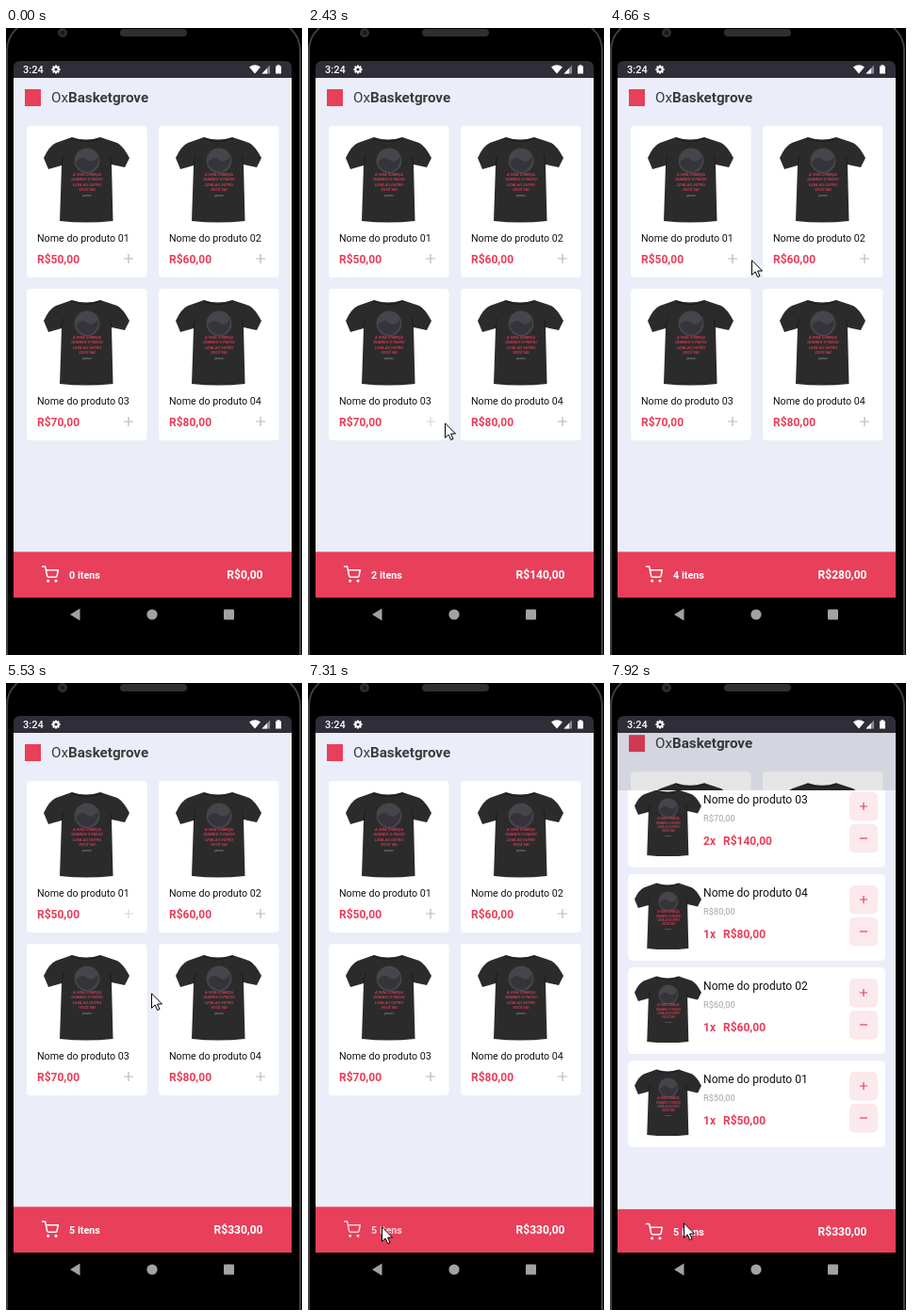
These frames come from a looping animation (314x666 px, 8000 ms). An HTML page:

```html
<!DOCTYPE html>
<html lang="pt-BR">
<head>
<meta charset="utf-8">
<title>Loja</title>
<style>
  html, body { margin: 0; width: 100%; height: 100%; overflow: hidden; background: #000; }
  svg { display: block; }
  text { font-family: Roboto, sans-serif; white-space: pre; }
  .bold { font-weight: 700; }
  .red { fill: #e83f5b; }
</style>
</head>
<body>
<svg id="stage" width="100%" height="100%" viewBox="0 0 314 666"></svg>
<script>
const LOOP = 8000, STEP = 77;
const RED = '#e83f5b', PAGE = '#ebeef8';
const SCREEN_TOP = 53, SCREEN_HEIGHT = 552, SCREEN_BOTTOM = 605;
const PRICES = [50, 60, 70, 80];
const CART_ROWS = [[2, 2], [3, 1], [1, 1], [0, 1]]; // product, quantity

// product, press time, release time
const TAPS = [[2, 1630, 1730], [2, 1960, 2270], [3, 3340, 3500], [1, 4190, 4340], [0, 5200, 5350]];
const CART_TAP = [7240, 7650];
const REVEAL_START = 7713, REVEAL_TIME = 425;

// time, x, y of the pointer tip
const POINTER = [
  [200, 243, 639], [970, 151, 535], [1509, 128, 421], [2356, 128, 421], [2433, 145, 419],
  [3203, 264, 421], [3588, 264, 421], [3896, 284, 320], [4127, 270, 246], [4358, 270, 246],
  [4666, 150, 246], [4974, 119, 231], [5051, 131, 236], [5282, 131, 236], [5975, 218, 596],
  [6360, 112, 564], [6822, 76, 573], [6976, 78, 577], [7746, 78, 577], [7900, 78, 573]
];

const money = value => `R$${value},00`;
const label = (x, y, size, content, extra = '') =>
  `<text x="${x}" y="${y}" font-size="${size}" ${extra}>${content}</text>`;
const box = (x, y, w, h, fill, r = 0) =>
  `<rect x="${x}" y="${y}" width="${w}" height="${h}" rx="${r}" fill="${fill}"/>`;
const plus = (x, y, r, color, extra = '') =>
  `<path d="M${x - r} ${y}h${2 * r}M${x} ${y - r}v${2 * r}" stroke="${color}" stroke-width="1.2" ${extra}/>`;
const shirt = (x, y, scale) =>
  `<use href="#shirt" transform="translate(${x} ${y}) scale(${scale})"/>`;
const page = () => box(8, SCREEN_TOP, 295, SCREEN_HEIGHT + 20, PAGE);

const shirtShape = () => {
  const lines = ['A VIDA COMEÇA', 'QUANDO O PASSO', 'LEVA AO OUTRO', 'VOCÊ VAI'];
  return `<g id="shirt">
    <path fill="#2b2b2c" d="M30 0Q45 5 60 0L78 6Q84 9 91 22L86 32 72 29 73.500 89Q45 92 17 89L19 30 5 34 0 22Q6 9 13 6Z"/>
    <path fill="none" stroke="#1c1c1d" d="M29 1Q45 8 61 1M19 30L21 19M72 29L70 19"/>
    <circle cx="46" cy="25" r="13.5" fill="#45454b"/>
    <path fill="#34343a" d="M34 27Q40 19 46 24T58 20Q59 32 48 37 37 36 34 27Z"/>
    ${lines.map((line, i) => label(46, 41 + i * 5.4, 4.1, line,
      'class="bold red" font-style="italic" text-anchor="middle" opacity=".85"')).join('')}
    ${label(46, 63, 3, 'passos', 'fill="#999" text-anchor="middle"')}
  </g>`;
};

const productCard = (price, i) => {
  const x = 22 + (i % 2) * 140, y = 104 + (i >> 1) * 173;
  return box(x, y, 127.5, 161, '#fff', 4) + shirt(x + 18, y + 12, 1) +
    label(x + 11, y + 122.5, 10.7, `Nome do produto 0${i + 1}`, 'fill="#111"') +
    label(x + 11, y + 145.5, 12, money(price), 'class="bold red"') +
    plus(x + 108, y + 141, 5, '#b7b7bd', `id="plus${i}"`);
};

const cartRow = ([product, quantity], i) => {
  const y = 101.5 + i * 99, price = PRICES[product];
  return box(19, y, 273, 92, '#fff', 5) + shirt(26, y + 9.5, 0.78) +
    label(99, y + 24, 12.1, `Nome do produto 0${product + 1}`, 'fill="#111"') +
    label(99, y + 43, 9.3, money(price), 'fill="#a3a3ab"') +
    label(99, y + 68, 12, `${quantity}x`, 'class="bold red"') +
    label(120, y + 68, 12, money(price * quantity), 'class="bold red"') +
    box(254, y + 12, 30, 30.5, '#fbe9ed', 5) + box(254, y + 46, 30, 30.5, '#fbe9ed', 5) +
    plus(269, y + 27, 4, RED) + `<path d="M265 ${y + 61}h8" stroke="${RED}" stroke-width="1.2"/>`;
};

const totalBar = (id, items, total) => box(8, 556.4, 295, 60, RED) +
  `<g id="${id}Button"><g transform="translate(37.800 571.200) scale(.76)" fill="none" stroke="#fff"
    stroke-width="2" stroke-linecap="round" stroke-linejoin="round">
    <circle cx="9" cy="21" r="1"/><circle cx="20" cy="21" r="1"/>
    <path d="M1 1h4l2.7 13.4a2 2 0 0 0 2 1.6h9.7a2 2 0 0 0 2-1.6L23 6H6"/></g>
    ${label(67, 585, 10.8, items, `id="${id}Items" class="bold" fill="#fff"`)}</g>` +
  label(272.5, 585, 12, total, `id="${id}Total" class="bold" fill="#fff" text-anchor="end"`);

const gearTeeth = Array.from({ length: 8 }, (_, i) =>
  `<path d="M53 39.4v2" transform="rotate(${i * 45} 53 44)"/>`).join('');

const phone = `
  <rect x="1" y="-8" width="311" height="720" rx="32" fill="#000" stroke="#404043" stroke-width="2"/>
  <circle cx="60" cy="5" r="5" fill="#2d2d31"/><circle cx="60" cy="5" r="2.2" fill="#17171c"/>
  ${box(121, 1, 71, 8, '#2f2f32', 4)}
  <path d="M8 54V42Q8 35 15 35H296Q303 35 303 42V54Z" fill="#2f2d38"/>
  ${label(18, 48, 11, '3:24', 'fill="#fff" font-weight="500"')}
  <g stroke="#fff" stroke-width="2">${gearTeeth}<circle cx="53" cy="44" r="2.6" fill="none"/></g>
  <path fill="#fff" d="M258 41.5Q264 37 270 41.5L264 48.5ZM286 40.5h1.5v-1.2h3v1.2h1.5v8h-6z"/>
  <path fill="#8c8b92" d="M271.500 48.500L280 39.500V48.500Z"/><path fill="#fff" d="M271.500 48.500L277 42.700V48.500Z"/>
  <g fill="#a2a2a2"><path d="M68 623L78.500 616.500V629.500Z"/><circle cx="155" cy="623" r="5.600"/>
  ${box(231, 617.5, 11, 11, '#a2a2a2', 1)}</g>`;

document.getElementById('stage').innerHTML = `
  <defs>
    ${shirtShape()}
    <clipPath id="screenClip"><rect x="8" y="${SCREEN_TOP}" width="295" height="${SCREEN_HEIGHT}"/></clipPath>
    <clipPath id="cartClip"><rect id="cartWindow" x="8" width="295" height="${SCREEN_HEIGHT}"/></clipPath>
  </defs>
  ${phone}
  <g clip-path="url(#screenClip)">
    <g id="shop">
      ${page()}
      ${box(20, 65, 17, 18, RED)}
      ${label(48, 79, 15.2, 'Ox<tspan class="bold">Basketgrove</tspan>', 'fill="#3b3b3f"')}
      ${PRICES.map(productCard).join('')}
      ${totalBar('shop', '', '')}
    </g>
    <rect id="shade" x="8" y="${SCREEN_TOP}" width="295" height="${SCREEN_HEIGHT}" fill="#000"/>
    <g clip-path="url(#cartClip)">
      ${page()}
      <g id="cart">${CART_ROWS.map(cartRow).join('')}${totalBar('cart', '5 itens', money(330))}</g>
    </g>
  </g>
  <path id="pointer" fill="#fff" stroke="#000" d="M.5 .8V16.300L4.200 12.900 6.600 18.500 9 17.500 6.600 12H11.500Z"/>`;

const el = id => document.getElementById(id);
const clamp = v => Math.max(0, Math.min(1, v));

function pressOpacity(t, down, up) {
  return t < up ? 1 - 0.8 * clamp((t - down) / 150) : 0.2 + 0.8 * clamp((t - up) / 350);
}

function pointerAt(t) {
  const next = POINTER.findIndex(point => point[0] > t);
  if (next < 0) return POINTER[POINTER.length - 1].slice(1);
  const [t0, x0, y0] = POINTER[Math.max(0, next - 1)], [t1, x1, y1] = POINTER[next];
  const s = clamp((t - t0) / (t1 - t0)), k = s * s * (3 - 2 * s);
  return [x0 + (x1 - x0) * k, y0 + (y1 - y0) * k];
}

// cubic-bezier(.35, .45, 0, 1), solved by bisection
function revealEase(x) {
  const curve = (s, a, b) => 3 * (1 - s) ** 2 * s * a + 3 * (1 - s) * s * s * b + s ** 3;
  let low = 0, high = 1;
  for (let i = 0; i < 24; i++) {
    const mid = (low + high) / 2;
    if (curve(mid, 0.35, 0) < x) low = mid; else high = mid;
  }
  return curve(low, 0.45, 1);
}

function render(time) {
  const t = time < 200 ? 0 : 200 + STEP * Math.min(100, Math.floor((time - 190) / STEP));

  const bought = TAPS.filter(tap => t >= tap[2]);
  el('shopItems').textContent = `${bought.length} itens`;
  el('shopTotal').textContent = money(bought.reduce((sum, tap) => sum + PRICES[tap[0]], 0));
  PRICES.forEach((_, i) => {
    const dims = TAPS.filter(tap => tap[0] === i).map(tap => pressOpacity(t, tap[1], tap[2]));
    el(`plus${i}`).setAttribute('opacity', Math.min(...dims));
  });
  el('shopButton').setAttribute('opacity', pressOpacity(t, ...CART_TAP));

  const progress = t > REVEAL_START ? revealEase(clamp((t - REVEAL_START) / REVEAL_TIME)) : 0;
  const rest = SCREEN_HEIGHT * (1 - progress);
  el('shop').setAttribute('transform', `translate(0 ${-0.02 * SCREEN_HEIGHT * progress})`);
  el('shade').setAttribute('opacity', 0.1 * clamp(progress / 0.36));
  el('cartWindow').setAttribute('y', progress ? SCREEN_TOP + rest : SCREEN_BOTTOM);
  el('cart').setAttribute('transform', `translate(0 ${0.041 * rest})`);

  const [x, y] = pointerAt(t).map(Math.round);
  el('pointer').setAttribute('transform', `translate(${x} ${y})`);
  el('pointer').setAttribute('visibility', t ? 'visible' : 'hidden');
}

const start = performance.now();
function tick() {
  render((performance.now() - start) % LOOP);
  requestAnimationFrame(tick);
}
tick();
</script>
</body>
</html>
```
